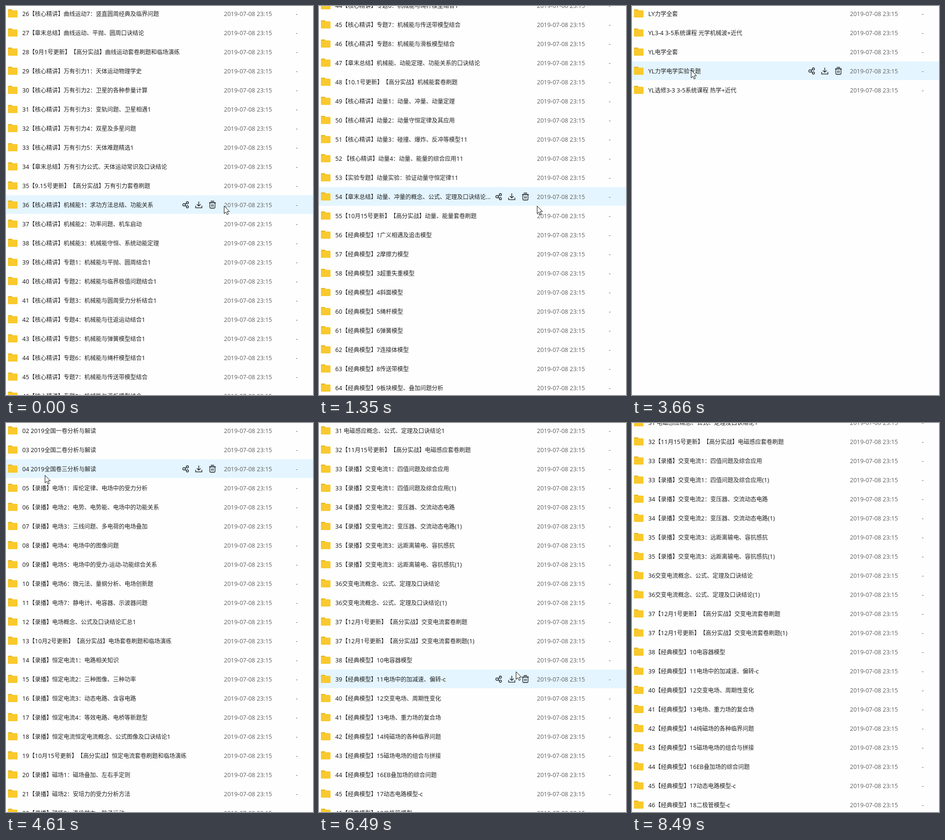
An HTML page that plays this animation: 641 px wide and 814 px high, repeating every 9070 ms.

```html
<!DOCTYPE html>
<html lang="zh-CN">
<head>
<meta charset="utf-8">
<title>文件列表</title>
<style>
html, body { margin: 0; width: 100%; height: 100%; overflow: hidden; background: #fefefe; }
svg { display: block; }
text { font: 12px "Noto Sans", "Noto Sans CJK SC", sans-serif; fill: #222; text-spacing-trim: space-all; font-kerning: none; white-space: pre; }
.latin, .meta { font-size: 12.5px; }
.meta { fill: #696969; }
</style>
</head>
<body>
<svg id="stage" width="641" height="814" viewBox="0 0 641 814">
  <defs>
    <g id="folder">
      <path d="M4 21V12.500Q4 11 5.500 11H12L14 13V21Z" fill="#e6b41c"/>
      <rect x="4" y="13" width="20" height="15" rx="1.500" fill="#f9c92d"/>
    </g>
  </defs>
  <rect width="641" height="814" fill="#fefefe"/>
  <rect id="band" width="641" height="39" fill="#e4f5ff"/>
  <g id="lists"></g>
  <g id="tools" fill="none" stroke="#15181d" stroke-width="1.300">
    <circle cx="371.800" cy="20" r="2.600"/>
    <circle cx="378.700" cy="15.800" r="2.300"/>
    <circle cx="378.700" cy="24.200" r="2.300"/>
    <path d="M374 18.600L376.700 17M374 21.400L376.700 23"/>
    <path d="M402.500 13V22.500M398.500 18.700L402.500 22.700L406.500 18.700M396 22V26.400H409V22"/>
    <path d="M424 15.500H438M427.500 12.500H434.500M429.500 19V24M432.500 19V24"/>
    <rect x="425.600" y="15.500" width="10.800" height="11.500" rx="1.500"/>
  </g>
  <path id="cursor" d="M.5 .5V16.500L4.200 13L6.700 18.700L9.300 17.600L6.800 12H11.700Z" fill="#fff" stroke="#111"/>
</svg>
<script>
const LOOP = 9070, ROW = 40, TOP = -4;
const lists = [`26【核心精讲】曲线运动7：竖直圆周经典及临界问题
27【章末总结】曲线运动、平抛、圆周口诀结论
28【9月1号更新】【高分实战】曲线运动套卷刷题和临场演练
29【核心精讲】万有引力1：天体运动物理学史
30【核心精讲】万有引力2：卫星的各种参量计算
31【核心精讲】万有引力3：变轨问题、卫星相遇1
32【核心精讲】万有引力4：双星及多星问题
33【核心精讲】万有引力5：天体难题精选1
34【章末总结】万有引力公式、天体运动常识及口诀结论
35【9.15号更新】【高分实战】万有引力套卷刷题
36【核心精讲】机械能1：求功方法总结、功能关系
37【核心精讲】机械能2：功率问题、机车启动
38【核心精讲】机械能3：机械能守恒、系统动能定理
39【核心精讲】专题1：机械能与平抛、圆周结合1
40【核心精讲】专题2：机械能与临界极值问题结合1
41【核心精讲】专题3：机械能与圆周受力分析结合1
42【核心精讲】专题4：机械能与往返运动结合1
43【核心精讲】专题5：机械能与弹簧模型结合1
44【核心精讲】专题6：机械能与绳杆模型结合1
45【核心精讲】专题7：机械能与传送带模型结合
46【核心精讲】专题8：机械能与滑板模型结合
47【章末总结】机械能、动能定理、功能关系的口诀结论
48【10.1号更新】【高分实战】机械能套卷刷题
49【核心精讲】动量1：动量、冲量、动量定理
50【核心精讲】动量2：动量守恒定律及其应用
51【核心精讲】动量3：碰撞、爆炸、反冲等模型11
52 【核心精讲】动量4：动量、能量的综合应用11
53【实验专题】动量实验：验证动量守恒定律11
54【章末总结】动量、冲量的概念、公式、定理及口诀结论...
55【10月15号更新】【高分实战】动量、能量套卷刷题
56【经典模型】1广义相遇及追击模型
57【经典模型】2摩擦力模型
58【经典模型】3超重失重模型
59【经典模型】4斜面模型
60【经典模型】5绳杆模型
61【经典模型】6弹簧模型
62【经典模型】7连接体模型
63【经典模型】8传送带模型
64【经典模型】9板块模型、叠加问题分析`,
`LY力学全套
YL3-4 3-5系统课程 光学机械波+近代
YL电学全套
YL力学电学实验专题
YL选修3-3 3-5系统课程 热学+近代`,
`02 2019全国一卷分析与解读
03 2019全国二卷分析与解读
04 2019全国卷三分析与解读
05【录播】电场1：库伦定律、电场中的受力分析
06【录播】电场2：电势、电势能、电场中的功能关系
07【录播】电场3：三线问题、多电荷的电场叠加
08【录播】电场4：电场中的图像问题
09【录播】电场5：电场中的受力-运动-功能综合关系
10【录播】电场6：微元法、量纲分析、电场创新题
11【录播】电场7：静电计、电容器、示波器问题
12【录播】电场概念、公式及口诀结论汇总1
13【10月2号更新】【高分实战】电场套卷刷题和临场演练
14【录播】恒定电流1：电路相关知识
15【录播】恒定电流2：三种图像、三种功率
16【录播】恒定电流3：动态电路、含容电路
17【录播】恒定电流4：等效电路、电桥等新题型
18【录播】恒定电流恒定电流概念、公式图像及口诀结论1
19【10月15号更新】【高分实战】恒定电流套卷刷题和临场演练
20【录播】磁场1：磁场叠加、左右手定则
21【录播】磁场2：安培力的受力分析方法
22【录播】磁场3：洛伦兹力、粒子运动
23【录播】磁场4：霍尔效应、回旋加速器等
24【录播】磁场5：复合场（叠加场）组合场交变电磁场
25 磁场概念、公式、定理及口诀结论汇总11
26【11月1号更新】【高分实战】磁场、粒子运动套卷刷题
27【录播】电磁感应1：电磁感应基本知识
28【录播】电磁感应2：感应电路的力-电-功能结合11
29【录播】电磁感应3：二次感应、自感、互感、涡流
30【录播】电磁感应4：感应的图像问题
31 电磁感应概念、公式、定理及口诀结论1
32【11月15号更新】【高分实战】电磁感应套卷刷题
33【录播】交变电流1：四值问题及综合应用
33【录播】交变电流1：四值问题及综合应用(1)
34【录播】交变电流2：变压器、交流动态电路
34【录播】交变电流2：变压器、交流动态电路(1)
35【录播】交变电流3：远距离输电、容抗感抗
35【录播】交变电流3：远距离输电、容抗感抗(1)
36交变电流概念、公式、定理及口诀结论
36交变电流概念、公式、定理及口诀结论(1)
37【12月1号更新】【高分实战】交变电流套卷刷题
37【12月1号更新】【高分实战】交变电流套卷刷题(1)
38【经典模型】10电容器模型
39【经典模型】11电场中的加减速、偏转-c
40【经典模型】12交变电场、周期性变化
41【经典模型】13电场、重力场的复合场
42【经典模型】14纯磁场的各种临界问题
43【经典模型】15磁场电场的组合与拼接
44【经典模型】16EB叠加场的综合问题
45【经典模型】17动态电路模型-c
46【经典模型】18二极管模型-c`].map(names => names.split("\n"));
const opened = [0, 2730, 4610];

// first change, last change, number of steps, distance
const scrolls = [
  [370, 640, 3, 480], [950, 1070, 2, 240], [1350, 1350, 1, 17],
  [5280, 5550, 3, 360], [5670, 5940, 3, 360], [6090, 6210, 2, 240],
  [6360, 6360, 1, 120], [6490, 6490, 1, 80], [6760, 6760, 1, 17]
];
// first change, last change, number of steps, destination
const moves = [
  [2310, 2580, 3, 120, -30], [2850, 3000, 2, 155, 153], [3120, 3270, 2, 140, 144],
  [3390, 4210, 7, 81, 109], [4730, 5000, 3, 414, 505], [6090, 6210, 2, 411, 520],
  [7200, 8220, 8, 400, 738], [8370, 8490, 2, 385, 846]
];

const byId = id => document.getElementById(id);
const shift = (node, x, y) => node.setAttribute("transform", `translate(${x} ${y})`);
const show = (node, on) => node.setAttribute("visibility", on ? "visible" : "hidden");

// Latin runs are set slightly larger than the Chinese characters.
const mixedText = name => name.replace(/[ -~]+/g, '<tspan class="latin">$&</tspan>');
const rowMarkup = (name, i) => `<g transform="translate(0 ${i * ROW})">
  <use href="#folder"/><text x="34" y="25">${mixedText(name)}</text>
  <text class="meta" x="455" y="25">2019-07-08 23:15</text>
  <text class="meta" x="605" y="25">-</text></g>`;
byId("lists").innerHTML = lists.map(names => `<g>${names.map(rowMarkup).join("")}</g>`).join("");
const groups = [...byId("lists").children];

function progress(t, first, last, steps) {
  if (t < first) return 0;
  if (t >= last) return 1;
  return (1 + Math.floor((t - first) / (last - first) * (steps - 1))) / steps;
}

function render(t) {
  const current = opened.filter(start => start <= t).length - 1;
  let offset = 0, x = 455, y = 418;
  for (const [first, last, steps, distance] of scrolls)
    if (first >= opened[current]) offset += distance * progress(t, first, last, steps);
  for (const [first, last, steps, toX, toY] of moves) {
    const p = progress(t, first, last, steps);
    x += (toX - x) * p;
    y += (toY - y) * p;
  }
  x = Math.round(x);
  y = Math.round(y);

  const top = TOP - Math.round(offset);
  groups.forEach((group, i) => {
    show(group, i === current);
    shift(group, 0, top);
  });
  const row = Math.floor((y - top) / ROW);
  const hovered = y >= 0 && y < 779 && row < lists[current].length;
  for (const node of [byId("band"), byId("tools")]) {
    show(node, hovered);
    shift(node, 0, top + row * ROW);
  }
  shift(byId("cursor"), x, y);
}

const begin = performance.now();
function tick() {
  render((performance.now() - begin) % LOOP);
  requestAnimationFrame(tick);
}
tick();
</script>
</body>
</html>
```
